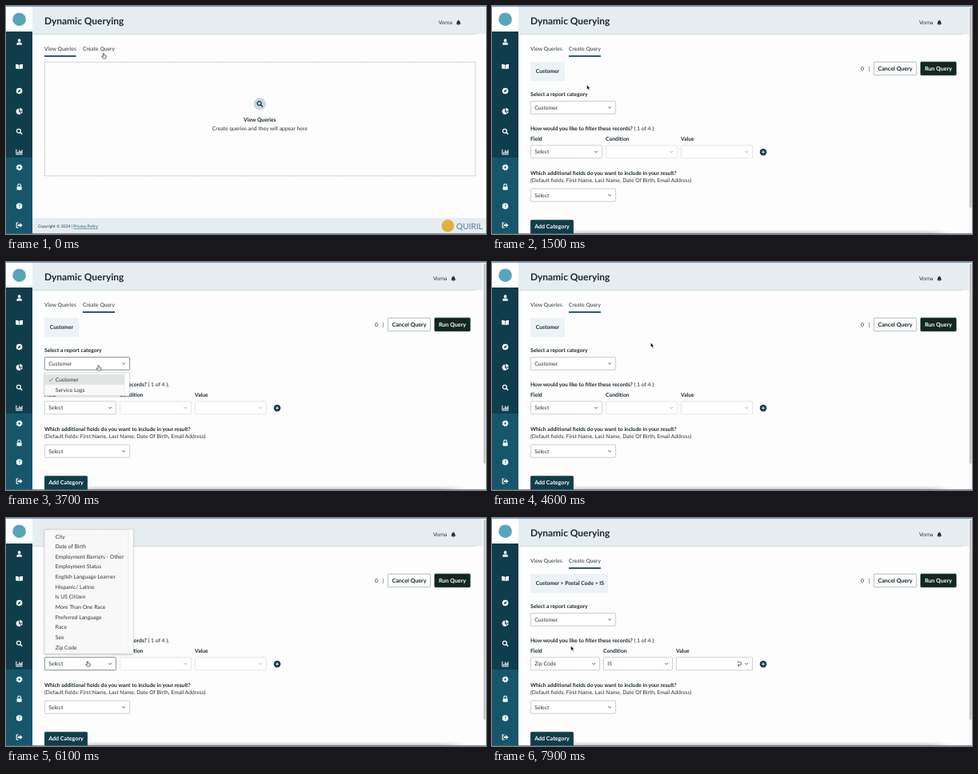
Recreate the animation shown at these times as an HTML page. Size 600 by 286 pixels, loop 8 s.

```html
<!DOCTYPE html>
<html lang="en">
<head>
<meta charset="utf-8">
<title>Dynamic Querying</title>
<style>
html, body { margin: 0; width: 100%; height: 100%; overflow: hidden; background: #fdfdfd; }
svg { display: block; width: 600px; height: 286px; }
text { font: 6.75px Lato, sans-serif; fill: #2b363b; white-space: pre; text-rendering: geometricPrecision; }
.b { font-weight: 700; fill: #1b2b31; }
.row { fill: #333; }
</style>
</head>
<body>
<svg id="stage" viewBox="0 0 600 286" xmlns="http://www.w3.org/2000/svg"></svg>
<script>
const LOOP = 8000;
const DARK = '#103d4c', TEAL = '#17566a', INK = '#14313b', PALE = '#e6edf0', CHIP = '#ecf3f6';

// Moments at which the interface switches, in ms
const AT = { page: 800, tabDone: 900, focus: 1900, menu: 2900, menuEnd: 4200,
  fieldFocus: 5100, fieldMenu: 5400, hover: 6500, chosen: 7500 };

const rect = (x, y, w, h, fill, extra = '') =>
  `<rect x="${x}" y="${y}" width="${w}" height="${h}" fill="${fill}" ${extra}/>`;
const text = (x, y, s, cls = '', extra = '') =>
  `<text x="${x}" y="${y}" class="${cls}" ${extra}>${s}</text>`;
const bold = (x, y, s, extra) => text(x, y, s, 'b', extra);
const line = (d, color, width = 1, extra = '') =>
  `<path d="${d}" fill="none" stroke="${color}" stroke-width="${width}" ${extra}/>`;
const dot = (x, y, r, fill) => `<circle cx="${x}" cy="${y}" r="${r}" fill="${fill}"/>`;
const put = (x, y, body) => `<g transform="translate(${x} ${y})">${body}</g>`;
const during = (from, to, body) => `<g data-from="${from}" data-to="${to}">${body}</g>`;

const chevron = (x, y, color) =>
  line(`M${x - 1.9} ${y - .9}l1.9 1.9 1.9-1.9`, color, .8);

function select(x, y, w, label = '', border = '#b3babd', arrow = '#333') {
  return rect(x + .4, y + .4, w - .8, 16, '#fff', `rx="1" stroke="${border}" stroke-width=".7"`) +
    text(x + 5.3, y + 10.8, label) + chevron(x + w - 7.8, y + 8.4, arrow);
}

function button(x, y, w, h, label, fill, color, border = fill) {
  return rect(x + .4, y + .4, w - .8, h - .8, fill, `rx=".8" stroke="${border}" stroke-width=".8"`) +
    bold(x + w / 2, y + 11.1, label, `text-anchor="middle" style="font-size:7.15px;fill:${color}"`);
}

const magnifier = color =>
  `<circle cx="-.7" cy="-.7" r="2.5" fill="none" stroke="${color}" stroke-width="1.2"/>` +
  line('M1.1 1.1L3.6 3.6', color, 1.4);

const icons = {
  person: dot(0, -1.9, 1.9, '#fff') + '<path d="M-3.3 3.8v-1Q-3.3.6-1 .6H1Q3.3.6 3.3 2.8v1z" fill="#fff"/>',
  book: '<path d="M-4.4-3Q-2-3.2-.3-2.2V3.2Q-2 2.3-4.4 2.4zM4.4-3Q2-3.2.3-2.2V3.2Q2 2.3 4.4 2.4z" fill="#fff"/>',
  compass: dot(0, 0, 3.8, '#fff') + `<path d="M2.1-2.1L.8.8-2.1 2.1-.8-.8z" fill="${DARK}"/>`,
  pie: '<path d="M-.5-3.5V.4L2.3 3.1A3.8 3.8 0 1 1-.5-3.5z" fill="#fff"/>' +
    '<path d="M.5-4A3.7 3.7 0 0 1 4.1-.4H.5zM.9.5H4.1Q4 2 3 2.9z" fill="#fff"/>',
  search: magnifier('#fff'),
  chart: line('M-3.7-3.2V3.1H4', '#fff') + line('M-1.8 2V0M0 2V-2.2M1.8 2V-.9M3.4 2V-2.8', '#fff', 1.1),
  gear: '<circle r="2.2" fill="none" stroke="#fff" stroke-width="1.9"/>' +
    '<circle r="3.4" fill="none" stroke="#fff" stroke-width="1.1" stroke-dasharray="1.5 1.17"/>',
  lock: rect(-3.1, -.6, 6.2, 4.3, '#fff', 'rx=".7"') + line('M-1.8-.4V-1.9a1.8 1.8 0 0 1 3.6 0V-.4', '#fff', 1.1),
  help: dot(0, 0, 3.8, '#fff') + bold(0, 2.1, '?', `text-anchor="middle" style="font-size:6px;fill:${TEAL}"`),
  exit: line('M-1-3H-3.4V3H-1', '#fff', 1.1) + '<path d="M-1.8-.9H.8V-2.9L4 0 .8 2.9V.9H-1.8z" fill="#fff"/>'
};

function sidebar() {
  const rows = [['person', 45], ['book', 76], ['compass', 106.5], ['pie', 132], ['search', 157.5],
    ['chart', 183], ['gear', 202.5], ['lock', 227], ['help', 251], ['exit', 275]];
  return rect(0, 0, 33, 32, '#fff') + rect(0, 32, 33, 158, DARK) + rect(0, 190, 33, 96, TEAL) +
    dot(16.6, 16.7, 8.3, '#5aa5b5') + rows.map(([name, y]) => put(16.6, y, icons[name])).join('');
}

function account(x) {
  return text(x, 23.2, 'Vorna') + put(x + 25.2, 20.8,
    `<path d="M-3.1 2Q-2 .9-2-.6A2 2 0 0 1 2-.6Q2 .9 3.1 2zM-.9 2.5H.9Q.7 3.5 0 3.5T-.9 2.5z" fill="${INK}"/>` +
    rect(-.4, -3.3, .8, 1, INK));
}

function header() {
  return rect(33, 0, 567, 35.5, PALE) + line('M33 35.5H587', '#cdd9de', .8) +
    bold(48, 23.2, 'Dynamic Querying', 'style="font-size:11.95px"') +
    during(0, AT.page, account(540.4)) + during(AT.page, LOOP, account(534));
}

function emptyView() {
  return rect(48, 62, 39.5, 1.7, DARK) +
    rect(48.4, 70.4, 538.4, 142.6, 'none', 'stroke="#9aa0a2" stroke-width=".7" stroke-dasharray="1.4 1"') +
    dot(317.3, 122.8, 7.6, '#c3dadf') + put(317.3, 122.8, magnifier(INK)) +
    bold(317.3, 145, 'View Queries', 'text-anchor="middle"') +
    text(317.3, 155.5, 'Create queries and they will appear here', '', 'text-anchor="middle"') +
    rect(33, 266, 567, 20, PALE) +
    text(40, 278, 'Copyright © 2024 | <tspan fill="#17566a" text-decoration="underline">Privacy Policy</tspan>',
      '', 'style="font-size:5.07px"') +
    dot(552.3, 275.8, 7.8, '#dfb23f') +
    text(562.8, 279.6, 'QUIRIL', '', 'style="font-size:10.2px;fill:#4b7d98"');
}

function filters(x2, x3, values) {
  const [field, condition] = values;
  const off = condition ? undefined : '#dadedf', arrow = condition ? '#333' : '#9aa0a3';
  return bold(48, 168.6, 'Field') + bold(x2, 168.6, 'Condition') + bold(x3, 168.6, 'Value') +
    select(48, 174.4, x2 - 52, field) +
    select(x2, 174.4, x3 - x2 - 4, condition, off, arrow) + select(x3, 174.4, 326 - x3, '', off, arrow);
}

function queryForm() {
  const outline = (y, w) => rect(48.4, y + .4, w - .8, 16, 'none', 'rx="1" stroke="#80898d" stroke-width=".8"');
  return during(AT.page, AT.tabDone, rect(48, 62, 39.5, 1, DARK) + rect(96, 62, 40, 1.1, DARK)) +
    during(AT.tabDone, LOOP, rect(96, 62, 40, 1.7, DARK)) +
    during(AT.page, AT.chosen, rect(48, 70, 43, 24, CHIP) + bold(54.8, 84.3, 'Customer') +
      filters(142, 236, ['Select', ''])) +
    during(AT.chosen, LOOP, rect(48, 70, 97, 24, CHIP) + bold(54.8, 84.3, 'Customer &gt; Postal Code &gt; IS') +
      filters(139, 230, ['Zip Code', 'IS']) +
      line('M306.8 180.7H309.6a2 2 0 0 1 0 4H307.4M308.6 183.2L307 184.7 308.6 186.2', '#333', .8)) +
    text(461, 80.8, '0') + text(470.4, 80.8, '|') +
    button(477, 69.8, 54, 17.3, 'Cancel Query', '#fff', '#14282f', '#a9b0b2') +
    button(535.5, 69.8, 45, 17.3, 'Run Query', '#11281f', '#fff') +
    bold(48, 113.4, 'Select a report category') + select(48, 119, 107, 'Customer') +
    bold(48, 155.9, 'How would you like to filter these records?' +
      '<tspan font-weight="400"> ( 1 of 4 );</tspan>') +
    dot(339, 183.2, 4.2, INK) + line('M336.8 183.2H341.2M339 181V185.4', '#fff', .9) +
    bold(48, 212, 'Which additional fields do you want to include in your result?') +
    text(48, 221.4, '(Default fields: First Name, Last Name, Date Of Birth, Email Address)') +
    select(48, 228.8, 107, 'Select') +
    rect(90, 284, 470, 8, '#000', 'opacity=".3" filter="url(#haze)"') +
    button(48, 268.3, 54, 18.7, 'Add Category', DARK, '#fff') +
    rect(596, 1, 4, 285, '#f7f7f7') + rect(597, 2, 2.6, 251, '#c1c3c4', 'rx="1.3"') +
    during(AT.focus, AT.menuEnd, outline(119, 107)) +
    during(AT.fieldFocus, AT.chosen, outline(174.4, 90));
}

function menu(y, w, h, items, body = '') {
  return rect(48, y, w, h, '#f8f8f8', 'stroke="#c4c7c8" stroke-width=".6" filter="url(#shadow)"') +
    rect(48 + w - 6, y + .3, 5.7, h - .6, '#fcfcfc') + line(`M${48 + w - 6} ${y}v${h}`, '#e2e2e2', .6) + body +
    items.map((s, i) => text(61.8, y + 11.3 + i * 12.66, s, 'row')).join('');
}

function menus() {
  const fields = ['City', 'Date of Birth', 'Employment Barriers - Other', 'Employment Status',
    'English Language Learner', 'Hispanic/ Latino', 'Is US Citizen', 'More Than One Race',
    'Preferred Language', 'Race', 'Sex', 'Zip Code'];
  return during(AT.menu, AT.menuEnd, menu(138.8, 106, 29, ['Customer', 'Service Logs'],
      rect(48.4, 141, 99.6, 12.8, '#e2e3e3') + line('M53.8 147.8l1.6 1.7 3-3.8', '#2f9a94', .9))) +
    during(AT.fieldMenu, AT.chosen, menu(14.2, 111, 156, fields,
      during(AT.hover, AT.chosen, rect(48.4, 156.2, 104.4, 12.6, '#e2e3e3'))));
}

const hand = '<g transform="scale(.88)"><path d="M-.7.5Q0-.6.7.5V2.7L3 3.2Q4 3.5 3.8 4.5L3.2 7.5H-.9L-2.7 4.9Q-3 4 -2 4.1L-.7 5z" ' +
  'fill="#fff" stroke="#222" stroke-width=".7"/>' + line('M.9 4.1v1.4M2.2 4.1v1.4', '#222', .35) + '</g>';
const arrow = '<path d="M0 0V5.8L1.4 4.6 2.4 6.8 3.4 6.3 2.4 4.2H4.2z" fill="#111" stroke="#fff" stroke-width=".4"/>';

const stage = document.getElementById('stage');
stage.innerHTML = '<defs><filter id="shadow" x="-10%" y="-20%" width="120%" height="150%">' +
  '<feDropShadow dx="0" dy="1" stdDeviation="1.2" flood-opacity=".22"/></filter>' +
  '<filter id="haze" x="-10%" y="-200%" width="120%" height="500%"><feGaussianBlur stdDeviation="12 2.5"/></filter></defs>' +
  rect(0, 0, 600, 286, '#fdfdfd') + header() +
  text(48, 56.4, 'View Queries') + text(96, 56.4, 'Create Query') +
  during(0, AT.page, emptyView()) + during(AT.page, LOOP, queryForm()) +
  sidebar() + rect(0, 0, 600, 1, '#7d9fc0') + rect(0, 285.3, 600, .7, '#53676f') +
  menus() + `<g id="cursor"><g id="hand">${hand}</g><g id="arrow">${arrow}</g></g>`;

const timed = [...stage.querySelectorAll('[data-from]')];
const [cursor, handShape, arrowShape] = ['cursor', 'hand', 'arrow'].map(id => document.getElementById(id));

// Pointer stops: time, x, y
const path = [[0, 122, 59.2], [100, 122, 59.2], [400, 122.6, 56.2], [1000, 122.6, 56.2], [1900, 115.6, 129.4],
  [3900, 115.6, 129.4], [4400, 198.4, 101.2], [4700, 198.4, 101.2], [5200, 102, 179.6],
  [6200, 102, 179.6], [6700, 98.6, 160.4], [LOOP, 98.6, 160.4]];
const handTimes = [[0, 1100], [1700, 3900], [5050, 6250]];

function pointer(t) {
  const i = path.findIndex(stop => stop[0] > t);
  const [t0, x0, y0] = path[i - 1], [t1, x1, y1] = path[i];
  const p = (t - t0) / (t1 - t0), e = p * p * (3 - 2 * p);
  return [x0 + (x1 - x0) * e, y0 + (y1 - y0) * e];
}

function draw() {
  const t = performance.now() % LOOP;
  for (const el of timed) {
    el.style.display = t >= el.dataset.from && t < el.dataset.to ? '' : 'none';
  }
  cursor.setAttribute('transform', `translate(${pointer(t).join(' ')})`);
  const isHand = handTimes.some(([from, to]) => t >= from && t < to);
  handShape.style.display = isHand ? '' : 'none';
  arrowShape.style.display = isHand ? 'none' : '';
  requestAnimationFrame(draw);
}
draw();
</script>
</body>
</html>
```
